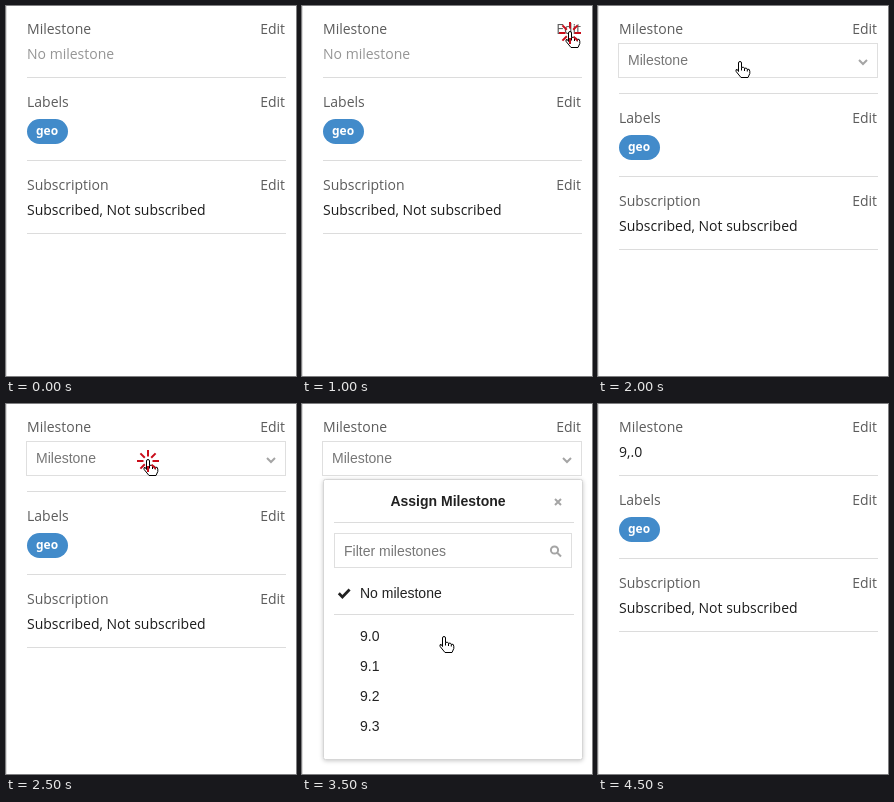
An HTML page for the animation above (6000 ms loop, 290 by 370 pixels).

```html
<!DOCTYPE html>
<html lang="en">
<head>
<meta charset="utf-8">
<title>Assigning a milestone</title>
<style>
  html, body { margin: 0; width: 100%; height: 100%; overflow: hidden; background: #fff; }
  svg { display: block; width: 290px; height: 370px; }
  text { font: 14px "Open Sans", "Noto Sans", sans-serif; fill: #5c5c5c; }
  .end { text-anchor: end; }
  .dark { fill: #1c1c1c; }
  .muted { fill: #959595; }
  .tag { font: 600 12px "Noto Sans", sans-serif; fill: #fff; }
  .form text, .menu text { font-family: "Liberation Sans", Arial, sans-serif; }
  .form text, .menu .hint { fill: #777; }
  .menu text { fill: #222; }
  .menu .title { font-weight: bold; text-anchor: middle; }
  .rule { stroke: #dcdcdc; }
  .field { fill: #fff; stroke: #dfdfdf; }
  .panel { fill: #fff; stroke: #d6d6d6; filter: drop-shadow(0 1px 2px rgba(0, 0, 0, .22)); }
  .icon { fill: none; stroke: #a5a5a5; stroke-width: 2; }
  .hand path { fill: #fff; stroke: #000; stroke-linejoin: round; }
  .burst { stroke: #c90d1a; stroke-width: 2; }

  .before, .after, .form, .menu, .shift, .hand, .burst { animation: 6s step-end infinite; }
  .before { animation-name: before; }
  .after { animation-name: after; }
  .form { animation-name: form; }
  .menu { animation-name: menu; }
  .shift { animation-name: shift; }
  .hand { animation-name: hand; }
  .burst { animation-name: burst; }

  @keyframes before { 0% { visibility: visible } 25%, 100% { visibility: hidden } }
  @keyframes after { 0% { visibility: hidden } 75%, 100% { visibility: visible } }
  @keyframes form { 0%, 75%, 100% { visibility: hidden } 25% { visibility: visible } }
  @keyframes menu { 0%, 75%, 100% { visibility: hidden } 50% { visibility: visible } }
  @keyframes shift { 0%, 75%, 100% { transform: none } 25% { transform: translateY(16px) } }
  @keyframes hand {
    0%, 25%, 50%, 75%, 100% { visibility: hidden; transform: translate(268px, 27px) }
    8.33% { visibility: visible; transform: translate(268px, 27px) }
    33.33% { visibility: visible; transform: translate(142px, 57px) }
    58.33% { visibility: visible; transform: translate(142px, 234px) }
  }
  @keyframes burst {
    0%, 25%, 50%, 75%, 100% { visibility: hidden }
    16.66%, 41.66%, 66.66% { visibility: visible }
  }
</style>
</head>
<body>
<svg viewBox="0 0 290 370">
  <path class="rule" d="M.5 0V370"/>
  <text x="21" y="28">Milestone</text>
  <text x="279" y="28" class="end">Edit</text>
  <text x="21" y="53" class="muted before">No milestone</text>
  <text x="21" y="53" class="dark after">9,.0</text>

  <g class="shift">
    <path class="rule" d="M21 71.5H280M21 154.5H280M21 227.5H280"/>
    <text x="21" y="101">Labels</text>
    <text x="279" y="101" class="end">Edit</text>
    <rect x="21" y="113" width="41" height="25" rx="12.5" fill="#428bca"/>
    <text x="30" y="129" class="tag">geo</text>
    <text x="21" y="184">Subscription</text>
    <text x="279" y="184" class="end">Edit</text>
    <text x="21" y="209" class="dark">Subscribed, Not subscribed</text>
  </g>

  <g class="form">
    <rect class="field" x="20.5" y="37.5" width="259" height="34"/>
    <text x="30" y="59">Milestone</text>
    <path class="icon" d="M261 54l4 4 4-4"/>
  </g>

  <g class="menu">
    <rect class="panel" x="21.5" y="75.5" width="259" height="280" rx="2"/>
    <text x="146" y="102" class="title">Assign Milestone</text>
    <path class="icon" d="M253 95l6 6m0-6l-6 6"/>
    <path class="rule" d="M32 118.5H272M32 210.5H272"/>
    <rect class="field" x="32.5" y="129.5" width="237" height="34"/>
    <text x="42" y="152" class="hint">Filter milestones</text>
    <g class="icon"><circle cx="252.5" cy="146" r="3.6"/><path d="M255 148.5l4 4"/></g>
    <path d="M36.8 189.3l3.6 3.6 7.2-7.4" fill="none" stroke="#222" stroke-width="2.8"/>
    <text x="58" y="194">No milestone</text>
    <text x="58" y="237">9.0</text>
    <text x="58" y="267">9.1</text>
    <text x="58" y="297">9.2</text>
    <text x="58" y="327">9.3</text>
  </g>

  <g class="hand">
    <path d="M-1.5 8.5V0Q-1.5-1.5 0-1.5T1.5 0V4.5Q3.8 3.4 4.5 5.3 6.4 4.4 7.3 6.2 9.8 5.6 9.8 8.2V10.5L8 14.5H1L-3.8 8.6Q-4.8 6.2-2.8 6.4Z"/>
    <path d="M1.5 4.5V7.5M4.5 5.3V8M7.3 6.2V8.5"/>
    <path class="burst" d="M0-11V-4.5M0 11V5M-11 0H-4.5M11 0H4.5M-7.6-7.6L-3.2-3.2M7.6-7.6L3.2-3.2M-7.6 7.6L-3.2 3.2M7.6 7.6L3.6 3.6" style="stroke:#c90d1a"/>
  </g>
</svg>
</body>
</html>
```
